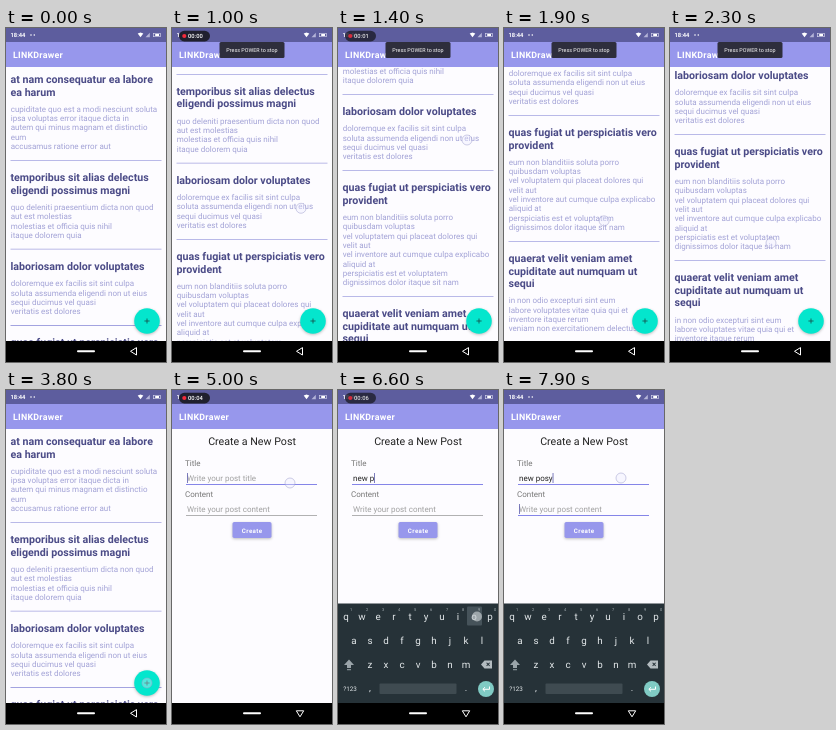
An HTML page with a canvas for the animation above (8000 ms loop, 160 by 334 pixels).

```html
<!DOCTYPE html>
<html lang="en">
<head>
<meta charset="utf-8">
<title>Post app</title>
<style>
html, body { margin: 0; width: 100%; height: 100%; overflow: hidden; background: #000; }
canvas { display: block; width: 160px; height: 334px; }
</style>
</head>
<body>
<canvas id="stage"></canvas>
<script>
const W = 160, H = 334, LOOP = 8000, BOTTOM = 313;
const BAR = '#9797ec', STATUS = '#5d5d9e', PAGE = '#fdfcff', INK = '#4b4b87', SOFT = '#a2a2d6';
const canvas = document.getElementById('stage'), c = canvas.getContext('2d');
const dpr = window.devicePixelRatio || 1;
canvas.width = W * dpr;
canvas.height = H * dpr;
c.scale(dpr, dpr);
c.textRendering = 'geometricPrecision';

const posts = [
  ['at nam consequatur ea labore|ea harum',
   'cupiditate quo est a modi nesciunt soluta|ipsa voluptas error itaque dicta in|autem qui minus magnam et distinctio|eum|accusamus ratione error aut'],
  ['temporibus sit alias delectus|eligendi possimus magni',
   'quo deleniti praesentium dicta non quod|aut est molestias|molestias et officia quis nihil|itaque dolorem quia'],
  ['laboriosam dolor voluptates',
   'doloremque ex facilis sit sint culpa|soluta assumenda eligendi non ut eius|sequi ducimus vel quasi|veritatis est dolores'],
  ['quas fugiat ut perspiciatis vero|provident',
   'eum non blanditiis soluta porro|quibusdam voluptas|vel voluptatem qui placeat dolores qui|velit aut|vel inventore aut cumque culpa explicabo|aliquid at|perspiciatis est et voluptatem|dignissimos dolor itaque sit nam'],
  ['quaerat velit veniam amet|cupiditate aut numquam ut|sequi',
   'in non odio excepturi sint eum|labore voluptates vitae quia qui et|inventore itaque rerum|veniam non exercitationem delectus aut']
].map(p => p.map(s => s.split('|')));

// time, scroll offset
const scrollKeys = [[0, 0], [500, 0], [1400, 154.7], [1850, 210.2], [1950, 210.2], [2300, 191], [2800, 157.6], [3250, 0]];

// start, end, from x, from y, to x, to y
const touches = [
  [500, 1450, 129, 266, 129, 112], [1850, 2350, 100, 190, 101, 215], [2880, 3250, 100, 180, 105, 321],
  [3780, 3980, 141, 293, 141, 293], [4850, 5050, 118, 93, 118, 93],
  [7350, 7500, 90, 119, 90, 119], [7800, 8000, 117, 88, 117, 88]
];

// pressed at, character
const typed = [[5560, 'n'], [5760, 'e'], [5960, 'w'], [6160, ' '], [6370, 'p'], [6560, 'o'], [6840, 's'], [7080, 'y']];
const HOLD = 120;

const keys = {};
[['qwertyuiop', 8, 226.5], ['asdfghjkl', 16, 250.5], ['zxcvbnm', 32, 274.5]].forEach(([row, x, y]) =>
  [...row].forEach((k, i) => keys[k] = [x + 16 * i, y]));

const clamp = v => Math.max(0, Math.min(1, v));
const ramp = (t, a, b) => clamp((t - a) / (b - a));
const easeOut = p => 1 - (1 - p) ** 3;

function track(list, t) {
  for (let i = 1; i < list.length; i++) {
    const [a, from] = list[i - 1], [b, to] = list[i];
    if (t <= b) return from + (to - from) * ramp(t, a, b);
  }
  return list[list.length - 1][1];
}

function rect(x, y, w, h, color, r = 0) {
  c.fillStyle = color;
  c.beginPath();
  c.roundRect(x, y, w, h, r);
  c.fill();
}

function disc(x, y, r, color) {
  c.fillStyle = color;
  c.beginPath();
  c.arc(x, y, r, 0, 7);
  c.fill();
}

function poly(points, color, fill) {
  c.beginPath();
  points.forEach(([x, y]) => c.lineTo(x, y));
  c.closePath();
  c[fill ? 'fillStyle' : 'strokeStyle'] = color;
  c.lineWidth = 1;
  c[fill ? 'fill' : 'stroke']();
}

function text(s, x, y, size, color, weight = 400, align = 'left', spacing = 0) {
  c.font = `${weight} ${size}px Roboto, sans-serif`;
  c.letterSpacing = spacing + 'px';
  c.textAlign = align;
  c.fillStyle = color;
  c.fillText(s, x, y);
}

function faded(alpha, draw) {
  if (alpha <= 0) return;
  c.save();
  c.globalAlpha *= alpha;
  draw();
  c.restore();
}

function shadowed(draw) {
  c.save();
  c.shadowColor = 'rgba(0,0,0,.25)';
  c.shadowBlur = 3 * dpr;
  c.shadowOffsetY = dpr;
  draw();
  c.restore();
}

function drawList(t) {
  let y = 55 - track(scrollKeys, t);
  for (const [title, body] of posts) {
    title.forEach((s, i) => text(s, 4.5, y + 12.5 * i, 10.67, INK, 700));
    const top = y + 12.5 * title.length + 3.8;
    body.forEach((s, i) => text(s, 4.7, top + 9.3 * i, 8, SOFT));
    rect(4.5, top + 9.3 * (body.length - 1) + 11, 151, 0.8, '#a3a3e0');
    y += 12.5 * title.length + 9.3 * body.length + 26.6;
  }
  shadowed(() => disc(141, 293, 12.8, '#04e6cd'));
  faded(0.25 * ramp(t, 3780, 3850), () => disc(141, 293, 12.8 * ramp(t, 3780, 4000), '#fff'));
  rect(138.4, 292.6, 5.2, 0.8, '#184b48');
  rect(140.6, 290.4, 0.8, 5.2, '#184b48');
}

function field(label, hint, value, y, focused, caret) {
  text(label, 13, y, 8, '#777');
  text(value || hint, 15, y + 15, 8, value ? '#222' : '#a0a0a0');
  const end = value ? 15 + c.measureText(value).width : 15;
  rect(14, y + 18, 131, focused ? 1 : 0.7, focused ? '#8585e8' : '#999');
  if (caret) rect(end, y + 7, 0.8, 10, '#5c5cac');
}

function drawForm(t) {
  rect(0, 39, W, BOTTOM - 39, PAGE);
  text('Create a New Post', 80, 55, 10.67, '#222', 400, 'center');
  const value = typed.filter(k => t >= k[0] + HOLD).map(k => k[1]).join('');
  const inTitle = t > 4900 && (t < 7430 || t > 7860);
  const inContent = t > 7430;
  field('Title', 'Write your post title', value, 76, inTitle, inTitle);
  field('Content', 'Write your post content', '', 107, inContent, inContent);
  shadowed(() => rect(60.5, 132, 39, 16, BAR, 1.8));
  text('Create', 80.2, 142.6, 6.2, '#fff', 700, 'center', 0.4);
}

function drawKeyboard(t) {
  const rise = easeOut(ramp(t, 5060, 5360));
  if (!rise) return;
  const ink = '#e2e7e9';
  c.save();
  c.translate(0, (1 - rise) * 100);
  rect(0, 213.5, W, 100, '#263238');
  const press = typed.find(k => t >= k[0] && t < k[0] + HOLD);
  const down = press && press[1];
  for (const k in keys) {
    const [x, y] = keys[k];
    if (k === down) rect(x - 7, y - 10, 15, 19, '#46535a', 1);
    text(k, x, y + 3, 9.8, ink, 400, 'center');
  }
  [...'1234567890'].forEach((n, i) => text(n, 13.2 + 16 * i, 220.5, 4, '#a7b0b4', 400, 'center'));
  poly([[11, 269.5], [16, 275], [13, 275], [13, 278], [9, 278], [9, 275], [6, 275]], '#9aa4a9', true);
  rect(9, 279.2, 4, 1, '#9aa4a9');
  poly([[143, 274.5], [146.5, 270.5], [154, 270.5], [154, 278.5], [146.5, 278.5]], '#b4bcc0', true);
  text('×', 150, 277.3, 8, '#263238', 700, 'center');
  text('?123', 12, 301.3, 6.3, ink, 400, 'center');
  text(',', 32, 301, 9.5, ink, 400, 'center');
  text('.', 128, 301, 9.5, ink, 400, 'center');
  rect(41.5, 293.5, 77, 10.5, down === ' ' ? '#5e6a70' : '#3f4b51', 1);
  disc(148, 299, 8, '#80cbc4');
  c.strokeStyle = '#fff';
  c.lineWidth = 1;
  c.beginPath();
  c.moveTo(151.5, 296.5);
  c.lineTo(151.5, 299.3);
  c.lineTo(145, 299.3);
  c.moveTo(147, 297.2);
  c.lineTo(144.8, 299.3);
  c.lineTo(147, 301.4);
  c.stroke();
  c.restore();
}

function drawStatus(t) {
  rect(0, 0, W, 14, STATUS);
  text('18:44', 4.5, 9.3, 5.8, '#fff', 700);
  disc(25, 7, 0.8, '#fff');
  disc(28.3, 7, 0.8, '#fff');
  poly([[131.7, 5.4], [134.5, 4.4], [137.3, 5.4], [134.5, 9.3]], '#fff', true);
  poly([[139.5, 9.3], [143.8, 9.3], [143.8, 4.8]], '#b4b4d8', true);
  c.lineWidth = 0.6;
  c.strokeStyle = '#dcdcf0';
  c.strokeRect(147.6, 5.3, 7, 3.4);
  rect(149.2, 6, 3.8, 2, '#fff');

  // the recording timer swaps with the clock every two seconds
  const p = t % 2000;
  faded(ramp(p, 420, 640) * (1 - ramp(p, 1360, 1620)), () => {
    rect(7, 2.8, 31, 10.6, '#20202e', 5.3);
    disc(12.3, 8, 2.1, '#f22b3b');
    const sec = Math.max(0, Math.floor((t - 200) / 1000));
    text('00:0' + sec, 16, 10.2, 5.8, '#fff', 500);
  });
}

function drawNav(t) {
  rect(0, BOTTOM, W, H - BOTTOM, '#000');
  rect(71, 322.3, 18, 1.9, '#fff', 1);
  c.save();
  c.translate(128, 323.3);
  if (t > 4950) c.rotate(-Math.PI / 2);
  poly([[-3.5, 0], [2.5, -3.7], [2.5, 3.7]], '#fff');
  c.restore();
}

function pointer(x, y) {
  disc(x, y, 5, 'rgba(235,235,255,.35)');
  c.strokeStyle = 'rgba(160,160,205,.65)';
  c.lineWidth = 0.8;
  c.stroke();
}

function drawTouches(t) {
  for (const [a, b, x0, y0, x1, y1] of touches) {
    const p = ramp(t, a, b - 50);
    if (t >= a && t < b) pointer(x0 + (x1 - x0) * p, y0 + (y1 - y0) * p);
  }
  for (const [at, k] of typed) {
    const [x, y] = keys[k] || [79, 299];
    if (t >= at && t < at + HOLD) disc(x + 3, y, 5, 'rgba(205,210,214,.65)');
  }
}

function render(t) {
  rect(0, 0, W, H, PAGE);
  c.save();
  c.beginPath();
  c.rect(0, 39, W, BOTTOM - 39);
  c.clip();
  const open = easeOut(ramp(t, 3980, 4250));
  if (open < 1) drawList(t);
  faded(open, () => {
    c.translate(0, (1 - open) * 25);
    drawForm(t);
  });
  drawKeyboard(t);
  c.restore();

  rect(0, 14, W, 25, BAR);
  text('LINKDrawer', 7, 30, 8.9, '#fff', 700, 'left', 0.25);
  drawStatus(t);
  faded(ramp(t, 500, 650) * (1 - ramp(t, 2450, 2600)), () => {
    rect(47.5, 14, 65, 16, '#2e2e3c', 1.5);
    text('Press POWER to stop', 80, 24, 5.4, '#fff', 400, 'center');
  });
  drawNav(t);
  drawTouches(t);
}

const start = performance.now();
function tick() {
  render((performance.now() - start) % LOOP);
  requestAnimationFrame(tick);
}
tick();
</script>
</body>
</html>
```
